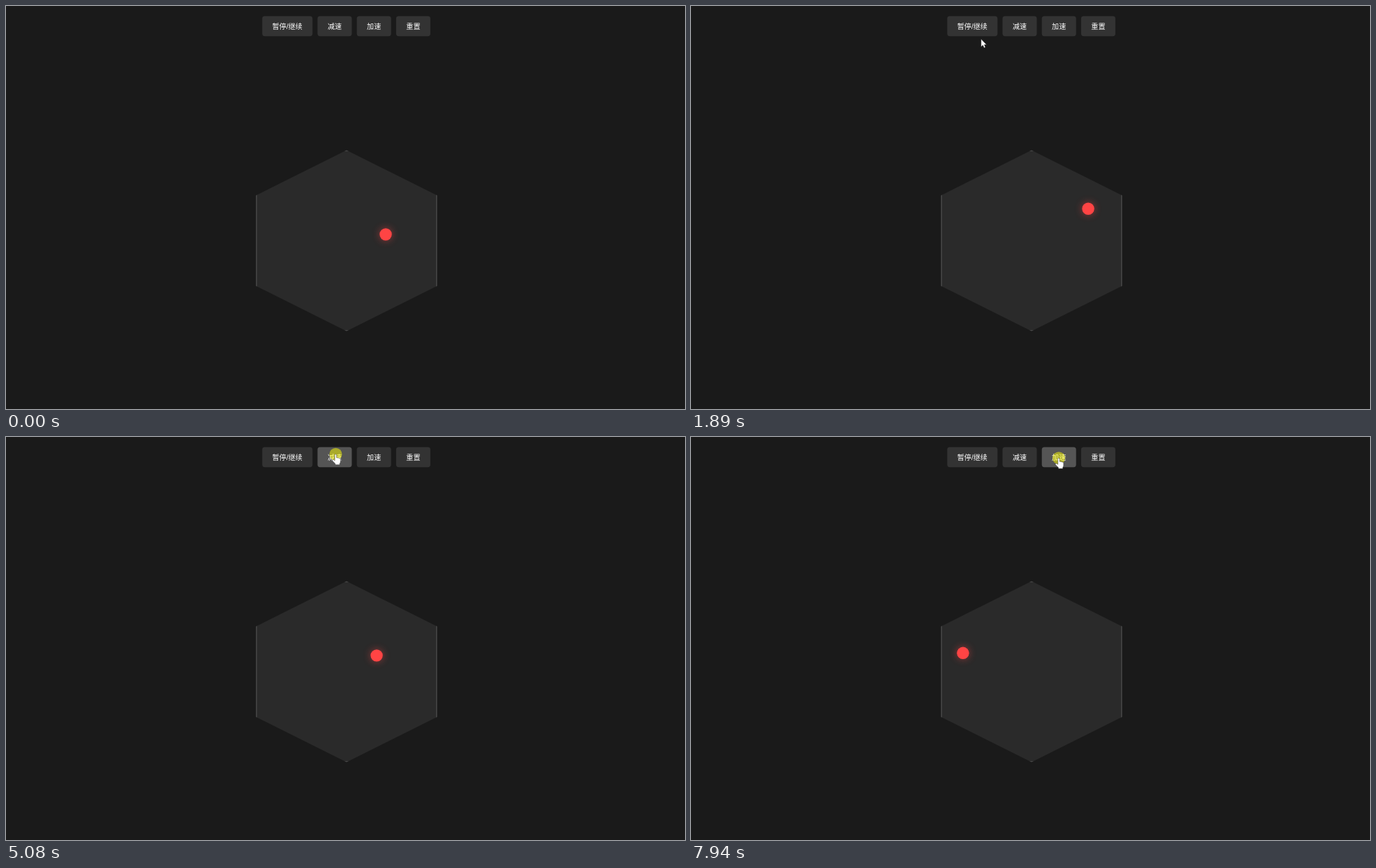
An HTML page that plays this animation: 971 px wide and 577 px high, repeating every 8 s.

```html
<!DOCTYPE html>
<html lang="zh-CN">
<head>
<meta charset="utf-8">
<title>六边形弹球</title>
<style>
html, body { margin: 0; width: 100%; height: 100%; overflow: hidden; background: #1a1a1a; }
svg { display: block; width: 100vw; height: 100vh; }
text { font: 10.08px "Liberation Sans", "Noto Sans CJK SC", "Noto Sans CJK", sans-serif; fill: #fff; text-anchor: middle; }
</style>
</head>
<body>
<svg viewBox="0 0 971 577">
  <defs>
    <clipPath id="hex"><path d="M0 -129.6L129.6 -64.8V64.8L0 129.6L-129.6 64.8V-64.8Z"/></clipPath>
    <filter id="blur" x="-200%" y="-200%" width="500%" height="500%"><feGaussianBlur stdDeviation="5.4"/></filter>
  </defs>
  <rect width="971" height="577" fill="#1a1a1a"/>
  <g id="buttons"></g>
  <g transform="translate(487 336)">
    <g clip-path="url(#hex)">
      <rect x="-129.6" y="-129.6" width="259.2" height="259.2" fill="#2a2a2a"/>
      <rect x="-128.9" y="-128.9" width="257.8" height="257.8" fill="none" stroke="#505050" stroke-width="1.44"/>
    </g>
    <g id="ball" fill="#ff4444">
      <circle r="8.7" opacity=".5" filter="url(#blur)"/>
      <circle r="8.7"/>
    </g>
  </g>
  <g id="cursor">
    <circle id="press" r="9" fill="#ff0" opacity=".5"/>
    <path id="arrow" d="M0 0V11.3L2.6 9L4.3 12.8L6.3 12L4.7 8.3H8Z" fill="#fff" stroke="#111" stroke-width=".5"/>
    <path id="hand" d="M-1.3 1Q-1.2 0 -.1 0Q1 0 1.1 1.1V5Q2.2 4.4 3.1 5.4Q4.2 4.8 5 5.9Q6.7 5.6 6.8 7.3V10.2Q6.8 12 5.7 13.2V15H-.6V13.6L-4.8 9.3Q-5.2 7.9 -4 7.7Q-3 7.6 -1.3 9.1Z" fill="#fff" stroke="#222" stroke-width=".4"/>
  </g>
</svg>
<script>
const LOOP = 8000, TICK = 67.8, LAG = 22;   // ms; the picture advances once per tick
const SPEED = 14.8;                         // px per tick
const HALF = 129.6, INSET = 9.1;
const $ = id => document.getElementById(id);
const dot = (a, b) => a[0] * b[0] + a[1] * b[1];
const along = (p, d, k) => [p[0] + d[0] * k, p[1] + d[1] * k];
const unit = (x, y) => [x / Math.hypot(x, y), y / Math.hypot(x, y)];

// Walls around the centre: outward normal and the distance the ball may reach.
const walls = [];
for (const sx of [-1, 1]) {
  walls.push({ n: [sx, 0], reach: HALF - INSET });
  for (const sy of [-1, 1]) {
    const n = unit(sx, 2 * sy);
    walls.push({ n, reach: HALF * Math.abs(n[1]) - INSET });
  }
}

// Clicks in ticks: release time, how long held, speed factor afterwards.
const click = (at, hold, factor) => ({ at, hold, factor });
const clicks = [
  click(46.8, 1.2, 0),
  click(58.35, 2.6, 1),
  ...[0, 1, 2].map(i => click(76 + 2.2 * i, 1.2, 0.8 ** (i + 1))),
  click(119, 2, 1)
];

// Pointer moves in ticks: start, end, goal.
const entry = { tick: 3, pos: [860, 358] };
const moves = [
  [3, 9, 801.7, 223.8], [13, 28, 414.8, 47.2], [29, 36, 404, 32.2],
  [60, 69, 471.5, 24.7], [108, 114, 526, 30.2]
];

const buttons = [];
let left = 366.4;
for (const [label, width] of [["暂停/继续", 71.9], ["减速", 49], ["加速", 49], ["重置", 49]]) {
  buttons.push({ label, width, x: left });
  left += width + 7.2;
}
const TOP = 14.4, HIGH = 28.8;
$("buttons").innerHTML = buttons.map(({ label, width, x }) =>
  `<rect x="${x}" y="${TOP}" width="${width}" height="${HIGH}" rx="3.6"/>` +
  `<text x="${x + width / 2}" y="33.2">${label}</text>`).join("");
const boxes = [...$("buttons").querySelectorAll("rect")];

function travelled(tick) {
  let sum = 0, from = 0, factor = 1;
  for (const c of clicks) {
    if (c.at > tick) break;
    sum += (c.at - from) * factor;
    from = c.at;
    factor = c.factor;
  }
  return SPEED * (sum + (tick - from) * factor);
}

function ballAt(dist) {
  let p = [56, -9], d = unit(-1, -0.222);
  for (;;) {
    let gap = Infinity, wall;
    for (const w of walls) {
      const speed = dot(d, w.n);
      if (speed <= 1e-9) continue;
      const k = (w.reach - dot(p, w.n)) / speed;
      if (k < gap) { gap = k; wall = w; }
    }
    if (gap >= dist) return along(p, d, dist);
    p = along(p, d, gap);
    d = along(d, wall.n, -2 * dot(d, wall.n));
    dist -= gap;
  }
}

function cursorAt(tick) {
  let p = entry.pos;
  for (const [a, b, x, y] of moves) {
    const u = Math.min(1, Math.max(0, (tick - a) / (b - a)));
    p = along(p, [x - p[0], y - p[1]], u * u * (3 - 2 * u));
  }
  return p;
}

const place = (id, p) => $(id).setAttribute("transform", `translate(${p[0]} ${p[1]})`);
const show = (id, on) => $(id).setAttribute("visibility", on ? "visible" : "hidden");

function draw(now) {
  const tick = Math.floor((now % LOOP + LAG) / TICK);
  const [x, y] = cursorAt(tick);
  const seen = tick >= entry.tick;
  place("ball", ballAt(travelled(tick)));
  place("cursor", [x, y]);

  let over = false;
  buttons.forEach((b, i) => {
    const hit = seen && x >= b.x && x <= b.x + b.width && y >= TOP && y <= TOP + HIGH;
    boxes[i].setAttribute("fill", hit ? "#555" : "#333");
    over = over || hit;
  });
  show("arrow", seen && !over);
  show("hand", seen && over);
  show("press", clicks.some(c => tick >= c.at - c.hold && tick < c.at));
}

const start = performance.now();
function frame() {
  draw(performance.now() - start);
  requestAnimationFrame(frame);
}
frame();
</script>
</body>
</html>
```
